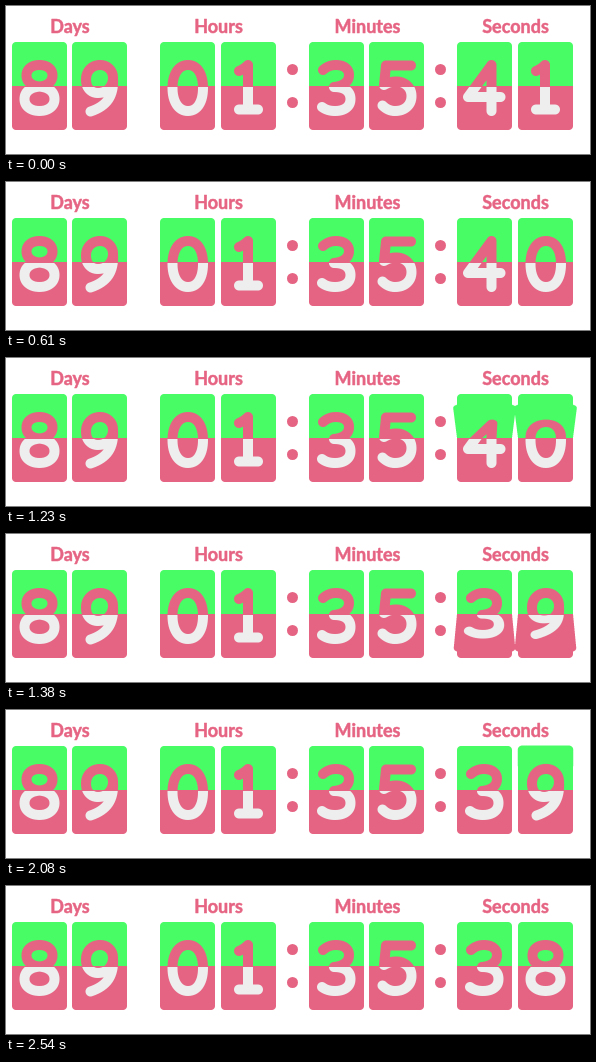
Recreate the animation shown at these times as an HTML page with a canvas. Size 584x148 px, loop 2940 ms.

```html
<!DOCTYPE html>
<html lang="en">
<head>
<meta charset="utf-8">
<title>Countdown</title>
<style>
html, body { margin: 0; width: 100%; height: 100%; overflow: hidden; background: #fff; }
canvas { display: block; }
</style>
</head>
<body>
<canvas id="stage" width="584" height="148"></canvas>
<script>
const ctx = document.getElementById('stage').getContext('2d');
const PINK = '#e66483', GREEN = '#48fc66', PALE = '#eeeeee';
const W = 55, HALF = 44, HINGE = 80, DEPTH = 250, RES = 4;
const LOOP = 2940, STEP = 230 / 3, DURATION = 500;

// Centre lines of the digits on a 55 x 88 card
const DIGITS = {
  0: 'M28 23C18 23 12.5 33 12.5 46S18 69 28 69S43 59 43 46S38 23 28 23Z',
  1: 'M18 29Q23 27 27 23V67.5M18 67.5H37',
  3: 'M14 28C18 24.5 22 23 27 23C35 23 40 27 40 33C40 40 34 44 25 45C35 45 41.5 49 41.5 57C41.5 65 35 69 26 69C21 69 17 68 13 65',
  4: 'M34.5 69V23L11 55H43.5',
  5: 'M42 23.5H17L15 43C19 40.5 23 39.5 27 39.5C36 39.5 42.5 45.5 42.5 54C42.5 63 36 69 26 69C21 69 17 67 13.5 63.5',
  8: 'M27.5 44.5C19 44 14.5 39 14.5 33.5C14.5 27 20 23 27.5 23S40.5 27 40.5 33.5C40.5 39 36 44 27.5 44.5C18 45.5 12.5 50 12.5 57C12.5 64.5 19 69 27.5 69S42.5 64.5 42.5 57C42.5 50 37 45.5 27.5 44.5Z',
  9: 'M41 36C41 28 35 23 28 23C20 23 14 29 14 37.5C14 46 19 51 26 51C35 51 41 44 41 36C42 54 35 64 18.5 69.5'
};

const LABELS = [['Days', 64], ['Hours', 212.5], ['Minutes', 361.5], ['Seconds', 509.5]];
const FIXED = [[6, 8], [66, 9], [154, 0], [215, 1], [303, 3], [363, 5]];
const SECONDS_X = [451, 512];

// at: first step, lag: time already turned by then, steps: steps until it rests
const FLIPS = [
  { at: 70, lag: 20, steps: 7, from: [4, 1], to: [4, 0] },
  { at: 1070, lag: 28, steps: 6, from: [4, 0], to: [3, 9] },
  { at: 2080, lag: 44, steps: 6, from: [3, 9], to: [3, 8] }
];

const cache = {};

function hiRes(w, h) {
  const c = document.createElement('canvas');
  c.width = w * RES;
  c.height = h * RES;
  const g = c.getContext('2d');
  g.scale(RES, RES);
  return g;
}

function face(digit, top) {
  const key = digit + (top ? 'top' : 'bottom');
  if (cache[key]) return cache[key];
  const g = hiRes(W, HALF);
  g.beginPath();
  g.roundRect(0, 0, W, HALF, top ? [4, 4, 0, 0] : [0, 0, 4, 4]);
  g.clip();
  g.fillStyle = top ? GREEN : PINK;
  g.fillRect(0, 0, W, HALF);
  if (!top) g.translate(0, -HALF);
  g.strokeStyle = top ? PINK : PALE;
  g.lineWidth = 10;
  g.lineCap = g.lineJoin = 'round';
  g.stroke(new Path2D(DIGITS[digit]));
  return cache[key] = g.canvas;
}

function hingeLine(x) {
  ctx.fillStyle = PINK;
  ctx.fillRect(x, HINGE, W, 1);
}

function card(x, upper, lower = upper) {
  ctx.drawImage(face(upper, true), x, HINGE - HALF, W, HALF);
  ctx.drawImage(face(lower, false), x, HINGE, W, HALF);
  hingeLine(x);
}

// cubic-bezier(.42, 0, .58, 1)
function easeInOut(t) {
  let lo = 0, hi = 1;
  for (let i = 0; i < 24; i++) {
    const s = (lo + hi) / 2, r = 1 - s;
    const x = 3 * r * r * s * 0.42 + 3 * r * s * s * 0.58 + s * s * s;
    if (x < t) lo = s; else hi = s;
  }
  return lo * lo * (3 - 2 * lo);
}

// Half card turning about the hinge, drawn in thin perspective rows
const PAD = 10, BUF_W = W + 2 * PAD, BUF_H = 2 * (HALF + PAD);
const buffer = hiRes(BUF_W, BUF_H);

function leaf(x, from, to, angle) {
  const top = angle < Math.PI / 2, row = 1 / RES, mid = BUF_H / 2;
  const img = face(top ? from : to, top);
  const cos = Math.abs(Math.cos(angle)), sin = Math.sin(angle);
  const along = v => v * DEPTH / (DEPTH * cos + v * sin);
  buffer.clearRect(0, 0, BUF_W, BUF_H);
  for (let v = 0; along(v) < HALF; v += row) {
    const near = along(v), far = Math.min(along(v + row), HALF);
    const w = W * DEPTH / (DEPTH - (near + far) / 2 * sin);
    const sy = top ? HALF - far : near;
    const dy = top ? mid - v - row : mid + v;
    buffer.drawImage(img, 0, sy * RES, W * RES, (far - near) * RES,
      (BUF_W - w) / 2, dy, w, row);
  }
  ctx.drawImage(buffer.canvas, x - PAD, HINGE - mid, BUF_W, BUF_H);
  hingeLine(x);
}

function drawSeconds(time) {
  const flip = FLIPS.filter(f => time >= f.at).pop();
  if (!flip) {
    SECONDS_X.forEach((x, i) => card(x, FLIPS[0].from[i]));
    return;
  }
  let step = 0;
  while (step < flip.steps &&
    time >= flip.at + Math.ceil((step + 1) * STEP / 10 - 1e-6) * 10) step++;
  const turning = step < flip.steps;
  const angle = Math.PI * easeInOut((flip.lag + step * STEP) / DURATION);
  SECONDS_X.forEach((x, i) => card(x, flip.to[i], (turning ? flip.from : flip.to)[i]));
  SECONDS_X.forEach((x, i) => {
    if (turning && flip.from[i] !== flip.to[i]) leaf(x, flip.from[i], flip.to[i], angle);
  });
}

function draw(time) {
  ctx.fillStyle = '#fff';
  ctx.fillRect(0, 0, 584, 148);
  ctx.fillStyle = ctx.strokeStyle = PINK;
  ctx.font = 'bold 18px Lato, sans-serif';
  ctx.textAlign = 'center';
  ctx.lineWidth = 0.5;
  ctx.lineJoin = 'round';
  for (const [text, x] of LABELS) {
    ctx.fillText(text, x, 26.5);
    ctx.strokeText(text, x, 26.5);
  }
  for (const x of [286.5, 434.5]) {
    for (const y of [63.5, 96.5]) {
      ctx.beginPath();
      ctx.arc(x, y, 5.5, 0, Math.PI * 2);
      ctx.fill();
    }
  }
  for (const [x, digit] of FIXED) card(x, digit);
  drawSeconds(time);
}

ctx.imageSmoothingQuality = 'high';
const start = performance.now();
function tick() {
  draw((performance.now() - start) % LOOP);
  requestAnimationFrame(tick);
}
tick();
</script>
</body>
</html>
```
